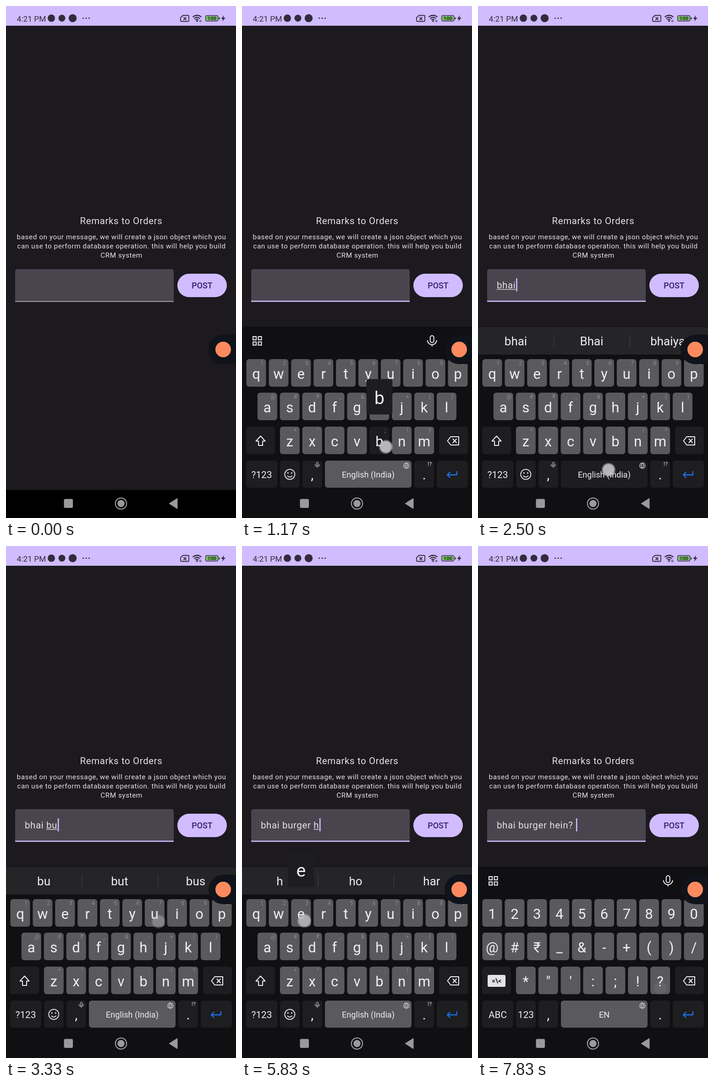
These frames come from a looping animation (502 px wide and 1115 px high, 8000 ms). An HTML page:

```html
<!DOCTYPE html>
<html lang="en">
<head>
<meta charset="utf-8">
<title>Typing demo</title>
<style>
  html, body { margin: 0; width: 100%; height: 100%; overflow: hidden; background: #1c1a1f; }
  svg { display: block; width: 502px; height: 1115px; font-family: Roboto, sans-serif; }
  text { white-space: pre; }
</style>
</head>
<body>
<svg id="stage" viewBox="0 0 502 1115"></svg>
<script>
const NS = 'http://www.w3.org/2000/svg';
const stage = document.getElementById('stage');

function el(tag, attrs, parent = stage, content) {
  const node = document.createElementNS(NS, tag);
  for (const k in attrs) node.setAttribute(k, attrs[k]);
  if (content !== undefined) node.textContent = content;
  parent.appendChild(node);
  return node;
}
const group = (parent = stage) => el('g', {}, parent);
const rect = (x, y, width, height, fill, parent, rx = 0) =>
  el('rect', { x, y, width, height, fill, rx }, parent);
const circle = (cx, cy, r, fill, parent) => el('circle', { cx, cy, r, fill }, parent);
const line = (d, stroke, width, parent) =>
  el('path', { d, fill: 'none', stroke, 'stroke-width': width, 'stroke-linejoin': 'round' }, parent);
const label = (content, x, y, size, fill, parent, extra = {}) =>
  el('text', { x, y, 'font-size': size, fill, 'text-anchor': 'middle', ...extra }, parent, content);
const show = (node, on) => node.setAttribute('display', on ? 'inline' : 'none');

const LILAC = '#d0bcff', INK = '#322b3d', PALE = '#e6e1e5', GLYPH = '#f0eef1';
const BOARD = '#100f11', KEY = '#5a595c', DARK = '#1e1d20', BLUE = '#1a73e8', HINT = '#8f8d92';

// ---- App screen ----
rect(0, 0, 502, 1115, '#1c1a1f');
label('Remarks to Orders', 251.5, 475, 20.45, PALE, stage, { 'letter-spacing': .639 });
['based on your message, we will create a json object which you',
 'can use to perform database operation. this will help you build',
 'CRM system'].forEach((s, i) =>
  label(s, 252, 507.5 + i * 20.45, 15.34, PALE, stage, { 'letter-spacing': .53 }));

el('path', { d: 'M20 644V578a5 5 0 0 1 5-5H361a5 5 0 0 1 5 5V644Z', fill: '#49454f' });
const idleLine = rect(20, 642.8, 346, 1.4, '#cac4d0');
const focusLine = rect(20, 641.7, 346, 2.6, LILAC);
const input = label('', 40.9, 615, 20.45, PALE, stage, { 'text-anchor': 'start', 'letter-spacing': .639 });
const underline = rect(0, 616.6, 0, 1.3, PALE);
const caret = rect(0, 593, 2.6, 28.5, LILAC);
rect(374, 583, 108, 51, LILAC, stage, 25.5);
label('POST', 428, 615.3, 17.9, '#381e72', stage, { 'font-weight': 500 });

// ---- Status bar ----
rect(0, 0, 502, 43, LILAC);
label('4:21 PM', 23.5, 33.5, 17.4, INK, stage, { 'text-anchor': 'start' });
circle(99, 26.5, 8, INK);
circle(122, 26.5, 7.5, INK);
circle(145.5, 26.5, 8.7, INK);
[168.5, 175, 181.5].forEach(x => circle(x, 26.5, 1.5, INK));
line('M386 20.5H397.500Q399 20.500 399 22V32Q399 33.500 397.500 33.500H382.500Q381 33.500 381 32V25.500Z', INK, 1.8);
line('M387.500 24.500L393.500 30.500M393.500 24.500L387.500 30.500', INK, 1.8);
line('M407.500 24Q417 16.500 426.500 24M410.500 27.500Q417 22 423.500 27.500M413.500 30.500Q417 28 420 30.500', INK, 2.2);
circle(417, 33, 1.8, INK);
line('M423 30.500V35M425.500 30.500V35', INK, 1.2);
rect(435, 20, 28.500, 13.500, INK, stage, 4);
rect(436.500, 21.500, 25.500, 10.500, LILAC, stage, 2.5);
rect(437.500, 22.500, 23.500, 8.500, '#5fc236', stage, 1.5);
rect(464.500, 24.500, 2, 5, INK, stage, 1);
label('100', 449.300, 30.700, 11, INK, stage, { 'font-weight': 700 });
el('path', { d: 'M476 20L469.500 28H473.500L472 33.500L479 25.500H474.700Z', fill: INK });

rect(0, 1054, 502, 61, '#000');

// ---- Keyboard ----
const board = group();
rect(0, 698, 502, 417, BOARD, board);

const tools = group(board);
[24, 35.5].forEach(x => [720, 731.5].forEach(y =>
  el('rect', { x, y, width: 7, height: 7, fill: 'none', stroke: GLYPH, 'stroke-width': 2 }, tools)));
el('rect', { x: 410.800, y: 718, width: 8, height: 15, rx: 4, fill: 'none', stroke: GLYPH, 'stroke-width': 2 }, tools);
line('M404.800 728a10 9.500 0 0 0 20 0M414.800 737.500V741.500', GLYPH, 2, tools);

const strip = group(board);
rect(0, 699, 502, 60, '#252427', strip);
[165.500, 331].forEach(x => rect(x, 715, 1, 28, '#454448', strip));
const words = [82.500, 248, 414].map(x => label('', x, 739, 26, GLYPH, strip));

const ROWS = [769, 842, 916, 990];
const PITCH = 48.9;
const pads = { abc: group(board), sym: group(board) };
const keys = {};

function key(pad, name, x, row, width, fill) {
  const y = ROWS[row];
  const face = rect(x, y, width, row === 3 ? 59 : 60, fill, pads[pad], 6);
  keys[pad + name] = { face, fill, cx: x + width / 2, y };
}

function keyRow(pad, chars, first, row, hints = '') {
  [...chars].forEach((c, i) => {
    const cx = first + i * PITCH, y = ROWS[row];
    key(pad, c, cx - 21.5, row, 43, KEY);
    label(c, cx, y + 42.500, 31, GLYPH, pads[pad]);
    if (hints) label([...hints][i], cx + 12.500, y + 13, 12.500, HINT, pads[pad]);
  });
}

keyRow('abc', 'qwertyuiop', 31, 0, '1234567890');
keyRow('abc', 'asdfghjkl', 55.3, 1, '@#₹_&-+()');
keyRow('abc', 'zxcvbnm', 104.3, 2, '*"\':;!?');
keyRow('sym', '1234567890', 31, 0);
keyRow('sym', '@#₹_&-+()/', 31, 1);
keyRow('sym', '*"\':;!?', 104.3, 2);

for (const pad in pads) {
  const g = pads[pad], abc = pad === 'abc';
  key(pad, 'shift', 9, 2, 63, DARK);
  key(pad, 'del', 430, 2, 63, DARK);
  key(pad, 'mode', 9, 3, 68, DARK);
  key(pad, 'alt', 83, 3, 43, DARK);
  key(pad, ',', 132, 3, 43, DARK);
  key(pad, ' ', 181, 3, 189, KEY);
  key(pad, '.', 376, 3, 43, DARK);
  key(pad, 'enter', 425, 3, 68, DARK);

  line('M455.500 938H473V956H455.500L448.500 947ZM460 942.500L468.500 951.500M468.500 942.500L460 951.500', GLYPH, 2, g);
  line('M469 1013V1021H448.500M454.500 1014.500L448 1021L454.500 1027.500', BLUE, 2.3, g);
  label(abc ? '?123' : 'ABC', 43, 1027.700, 20.800, GLYPH, g);
  label(abc ? 'English (India)' : 'EN', 275.500, 1026.500, 18.1, GLYPH, g);
  label(',', 153.300, 1031, 30, GLYPH, g);
  label('.', 397.800, 1031, 30, GLYPH, g);
  line('M352.500 1001a6.300 6.300 0 1 0 12.600 0a6.300 6.300 0 1 0-12.600 0H365.100M358.800 994.700' +
    'q-5.500 6.300 0 12.600q5.500-6.300 0-12.600M354 997.500H363.600M354 1004.500H363.600', '#c4c2c6', 1.1, g);

  if (abc) {
    line('M40.500 936.500L30.500 947.500H36V957H45V947.500H50.500Z', GLYPH, 2, g);
    el('circle', { cx: 104.300, cy: 1020, r: 11, fill: 'none', stroke: '#d5d3d7', 'stroke-width': 2 }, g);
    circle(100.300, 1017, 1.700, '#d5d3d7', g);
    circle(108.300, 1017, 1.700, '#d5d3d7', g);
    line('M98.800 1023q5.500 6 11 0', '#d5d3d7', 2, g);
    el('rect', { x: 162.300, y: 993.500, width: 4, height: 7, rx: 2, fill: 'none', stroke: '#c4c2c6', 'stroke-width': 1.2 }, g);
    line('M159.300 998a5 5 0 0 0 10 0M164.300 1003V1005.500', '#c4c2c6', 1.2, g);
    label('!?', 409.500, 1002, 12.500, '#d5d3d7', g);
  } else {
    rect(21, 934, 39, 26, '#e4e2e8', g, 3);
    label('=\\<', 40.500, 952, 14, '#1e1d20', g, { 'font-weight': 700 });
    label('123', 104.500, 1027.700, 20.800, GLYPH, g);
  }
}

const popup = group(board);
rect(-28.300, 0, 56.600, 77, '#1d1c1f', popup, 5);
const popupText = label('', 0, 54, 39, GLYPH, popup);

// ---- Navigation bar, floating bubble, touch dot ----
const GREY = '#9b999d';
rect(126.500, 1073.500, 19.500, 19.500, GREY, stage, 3);
el('circle', { cx: 251, cy: 1083.500, r: 12.200, fill: 'none', stroke: GREY, 'stroke-width': 2.200 });
circle(251, 1083.500, 7.800, GREY);
el('path', { d: 'M373.500 1073V1094L357 1083.500Z', fill: GREY, stroke: GREY, 'stroke-width': 2, 'stroke-linejoin': 'round' });

el('path', { d: 'M502 716H474a32 32 0 0 0 0 64H502Z', fill: '#10131a' });
circle(474, 748, 17, '#fd8a5e');

const dot = group();
circle(0, 0, 15.500, 'rgba(225,220,245,.25)', dot);
circle(0, 0, 14, 'rgba(225,220,245,.3)', dot);
circle(0, 0, 12.500, 'rgba(188,187,192,.9)', dot);

// ---- Timeline ----
const LOOP = 8000, STEP = 1000 / 12, COMMIT = 50, FADE = 160, FOCUS = 250;

// key, finger down, finger up, touch x, touch y
const presses = [
  ['field', 160, 240, 215, 612],
  ['b', 1000, 1180, 314, 960],
  ['h', 1330, 1410, 312, 889],
  ['a', 1660, 1765, 86, 892],
  ['i', 2160, 2240, 383, 816],
  [' ', 2490, 2530, 285, 1010],
  ['b', 2830, 2920, 313, 960],
  ['u', 3160, 3245, 333, 818],
  ['r', 3660, 3740, 188, 814],
  ['g', 3910, 3990, 262, 889],
  ['e', 4330, 4430, 137, 811],
  ['r', 4580, 4650, 187, 813],
  [' ', 5080, 5160, 285, 1010],
  ['h', 5500, 5580, 313, 889],
  ['e', 5750, 5815, 136, 816],
  ['i', 6080, 6150, 383, 815],
  ['n', 6330, 6450, 361, 960],
  ['mode', 6910, 6920, 52, 1026],
  ['?', 7660, 7690, 398, 962]
];

const suggestions = {
  'b': 'b but be',
  'bh': 'bh bhi bhai',
  'bha': 'bha bhai Bhai',
  'bhai': 'bhai Bhai bhaiya',
  'bhai ': 'ka ko ki',
  'bhai bu': 'bu but bus',
  'bhai bur': 'bur burger burn',
  'bhai burg': 'burg burger burgers',
  'bhai burge': 'burge *burger burgers',
  'bhai burger': 'burger burgers Burger',
  'bhai burger ': 'and ka hai',
  'bhai burger h': 'h ho har',
  'bhai burger he': 'he hey her',
  'bhai burger hei': 'hei hein height',
  'bhai burger hein': 'hein hain Hein',
  'bhai b': 'b but be'
};

function typing(t) {
  let text = '', edited = FOCUS, pad = 'abc';
  for (const [name, , up] of presses) {
    const at = up + COMMIT;
    if (at > t) break;
    if (name === 'mode') pad = 'sym';
    else if (name !== 'field') {
      text += name === '?' ? '? ' : name;
      edited = at;
    }
  }
  return { text, edited, pad };
}

function drawField(text, edited, t) {
  const focused = t >= FOCUS;
  show(idleLine, !focused);
  show(focusLine, focused);
  input.textContent = text;
  const end = text ? input.getComputedTextLength() : 0;
  const start = text.lastIndexOf(' ') + 1;
  const offset = start && start < text.length ? input.getSubStringLength(0, start) : 0;
  show(underline, start < text.length);
  underline.setAttribute('x', 40.9 + offset);
  underline.setAttribute('width', Math.max(0, end - offset));
  caret.setAttribute('x', 41.7 + end);
  show(caret, focused && Math.floor((t - edited) / 500) % 2 === 0);
}

function drawStrip(text) {
  const list = suggestions[text];
  show(strip, !!list);
  show(tools, !list);
  if (!list) return;
  list.split(' ').forEach((word, i) => {
    const strong = word[0] === '*';
    words[i].textContent = word.replace('*', '');
    words[i].setAttribute('fill', strong ? BLUE : GLYPH);
    words[i].setAttribute('font-weight', strong ? 700 : 400);
  });
}

function drawTouch(t, pad) {
  for (const id in keys) keys[id].face.setAttribute('fill', keys[id].fill);
  const press = presses.filter(p => p[1] <= t).pop();
  show(popup, false);
  show(dot, !!press);
  if (!press) return;

  const [name, , up, x, y] = press;
  const fade = 1 - Math.max(0, t - up) / FADE;
  dot.setAttribute('transform', `translate(${x} ${y})`);
  dot.setAttribute('opacity', Math.max(0, fade));

  const k = keys[pad + name];
  if (!k) return;
  if (t < up) k.face.setAttribute('fill', k.fill === KEY ? '#1d1c1f' : '#3c3b3f');
  if (name.length === 1 && name !== ' ' && t < up + COMMIT) {
    popup.setAttribute('transform', `translate(${k.cx} ${k.y - 103.5})`);
    popupText.textContent = name;
    show(popup, true);
  }
}

function draw(t) {
  const { text, edited, pad } = typing(t);
  const rise = Math.min(1, Math.max(0, (t - 330) / 420));
  board.setAttribute('transform', `translate(0 ${417 * (1 - rise) ** 3})`);
  show(board, rise > 0);
  show(pads.abc, pad === 'abc');
  show(pads.sym, pad === 'sym');
  drawField(text, edited, t);
  drawStrip(text);
  drawTouch(t, pad);
}

const begin = performance.now();
let last = -1;
function tick() {
  const time = (performance.now() - begin) % LOOP;
  const step = Math.floor((time + 5) / STEP) % 96;
  if (step !== last) draw(step * STEP);
  last = step;
  requestAnimationFrame(tick);
}
tick();
</script>
</body>
</html>
```
